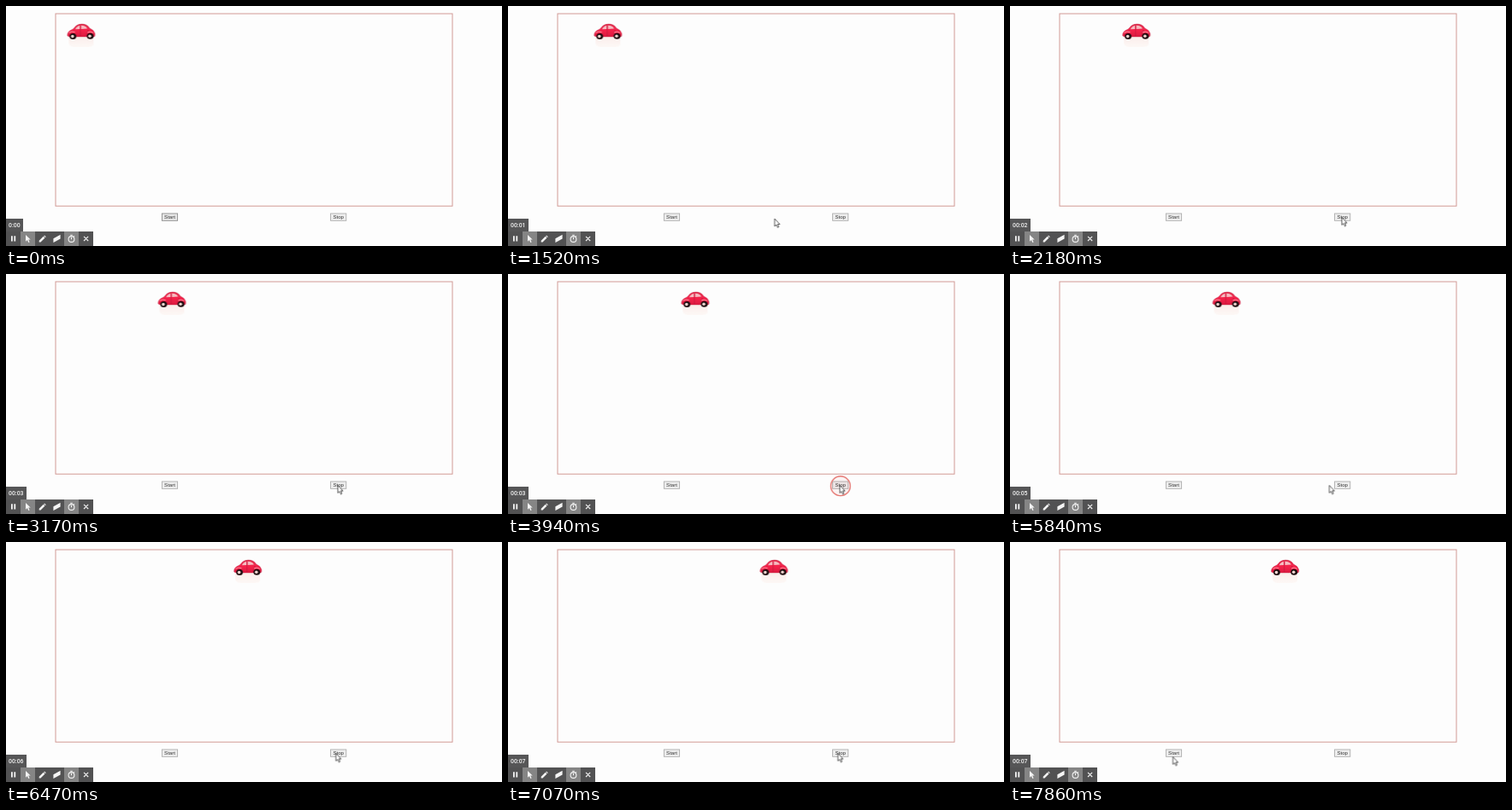
An HTML page that plays this animation: 580x281 px, repeating every 8 s.

```html
<!DOCTYPE html>
<html lang="en">
<head>
<meta charset="utf-8">
<title>Car start and stop</title>
<style>
  html, body { margin: 0; width: 100%; height: 100%; overflow: hidden; background: #fdfdfd; }
  svg { display: block; width: 580px; height: 281px; }
  .button rect { fill: #eee; stroke: #adadad; stroke-width: .9; }
  .button text { font: 6.1px "Liberation Sans", Arial, sans-serif; text-anchor: middle; fill: #333; }
  #time { font: 500 6.9px Roboto, sans-serif; fill: #f4f4f4; }
  .line { fill: none; stroke: #f4f4f4; stroke-width: 1.1; }

  #car, #pointer, #ring, #start rect { animation: 8s linear infinite; }
  #car { animation-name: drive; }
  #pointer { animation-name: point; }
  #ring { animation-name: click; animation-timing-function: step-end; }
  #start rect { animation-name: hover; animation-timing-function: step-end; }

  @keyframes drive {
    0%, 11.25% { transform: translateX(71.3px); }
    46.3%, 63.9% { transform: translateX(202.3px); }
    91.25%, 100% { transform: translateX(305px); }
  }
  @keyframes point {
    0%, 2.74% { opacity: 0; }
    2.75%, 100% { opacity: 1; }
    0%, 14.25% { transform: translate(191px, 247px); }
    19% { transform: translate(311.5px, 249px); }
    23.75% { transform: translate(387px, 253px); }
    26.4%, 50.75% { transform: translate(388px, 247.5px); }
    57.5%, 64.25% { transform: translate(192px, 247px); }
    66.25% { transform: translate(202px, 246px); }
    73.5%, 93% { transform: translate(385.7px, 247.5px); }
    98.25%, 100% { transform: translate(190.5px, 251.5px); }
  }
  @keyframes click {
    0%, 13%, 50.75%, 66%, 94.6%, 100% { opacity: 0; }
    9%, 62.5% { opacity: 1; transform: translateX(191.5px); }
    46.3%, 90.9% { opacity: 1; transform: translateX(388.8px); }
  }
  @keyframes hover {
    0%, 57.5% { fill: #e7e7e7; stroke: #8c8c8c; }
    14.5%, 66.5%, 100% { fill: #eee; stroke: #adadad; }
  }
</style>
</head>
<body>
<svg viewBox="0 0 580 281">
  <defs>
    <linearGradient id="paint" x2="0" y2="1">
      <stop offset="0" stop-color="#e2304f"/>
      <stop offset=".5" stop-color="#f4224a"/>
      <stop offset="1" stop-color="#dc1a40"/>
    </linearGradient>
    <linearGradient id="shade" x2="0" y2="1">
      <stop offset="0" stop-color="#fbeeeb"/>
      <stop offset="1" stop-color="#fdf8f6"/>
    </linearGradient>
    <g id="wheel">
      <ellipse rx="3.9" ry="3.5" fill="#1d0d10"/>
      <ellipse cx="-.5" rx="1.8" ry="1.8" fill="#f1d9d3"/>
    </g>
  </defs>

  <rect x="58" y="9" width="464" height="225.2" fill="none" stroke="#d29a95"/>

  <!-- Car, with its left bumper at x = 0 -->
  <g id="car">
    <path d="M2 36H31V45Q30 48 25 48H7Q2 47 2 43Z" fill="url(#shade)"/>
    <path d="M.6 34.8Q0 31 4 28.6Q7.5 27.4 9 25Q11.3 21.4 17 21.1Q23.6 21 26.5 26Q31.5 28 32.6 32Q33.3 34.8 32 36H4Q1.2 36 .6 34.8Z"
          fill="url(#paint)" stroke="#b5203f" stroke-width=".4"/>
    <path d="M9.8 27.3Q11 23.7 15 23V27.1ZM16.5 22.8Q21.7 22.6 23.8 26.5L16.5 27.1Z" fill="#f6bcc1"/>
    <path d="M15.7 23V35M25 28Q23.2 31 22.6 35" fill="none" stroke="#b0183a" stroke-width=".5"/>
    <path d="M2.4 31.4Q5.5 28.9 9.4 30.6M23.8 31Q27 28.9 30.8 31.4" fill="none" stroke="#ff93a0" stroke-width="1"/>
    <use href="#wheel" x="7" y="35.6"/>
    <use href="#wheel" x="27.2" y="35.3"/>
  </g>

  <g class="button" id="start"><rect x="182.4" y="243" width="18.2" height="8.3"/><text x="191.5" y="249.3">Start</text></g>
  <g class="button"><rect x="379.6" y="243" width="18.2" height="8.3"/><text x="388.7" y="249.3">Stop</text></g>

  <!-- Recorder toolbar -->
  <rect id="badge" y="249" width="20" height="15" fill="#565657"/>
  <text id="time" x="3" y="259.2">0:00</text>
  <path d="M0 264H102V281H0Z" fill="#525253"/>
  <path d="M17 264H34V281H17ZM68 264H85V281H68Z" fill="#858585"/>
  <path d="M6 269.3h1.8v6.3H6zM9.4 269.3h1.8v6.3H9.4z
           M23 268v7.8l1.9-1.7 1.4 3 1.3-.6-1.4-2.9h2.5z
           M38.7 276.6v-1.8l5-5 1.8 1.8-5 5zM44.2 269.3l.8-.8 1.8 1.8-.8.8z
           M55.4 272.2L63.6 267.8V272.4L55.4 277Z" fill="#f4f4f4"/>
  <circle class="line" cx="76.5" cy="273" r="3.4"/>
  <path class="line" d="M75.2 268.2h2.6M76.5 270.8v2.5M79.2 270.2l.8-.8M91 269.8l5.2 5.2M96.2 269.8l-5.2 5.2"/>

  <circle id="ring" r="11.4" cy="248.2" fill="#e03a3a" fill-opacity=".05" stroke="#e57772" stroke-width="1.4"/>
  <path id="pointer" d="M0 0V8.9L2 7.1L3.5 10.3L4.9 9.6L3.5 6.5H6.1Z" fill="#fff" stroke="#333" stroke-width=".8"/>
</svg>

<script>
const LOOP = 8000;
const badge = document.getElementById("badge");
const time = document.getElementById("time");
const origin = performance.now();

function tick() {
  const t = (performance.now() - origin) % LOOP;
  const early = t < 100;
  badge.setAttribute("width", early ? 20 : 24);
  time.textContent = early ? "0:00" : "00:0" + Math.floor(t / 1000);
  requestAnimationFrame(tick);
}
tick();
</script>
</body>
</html>
```
